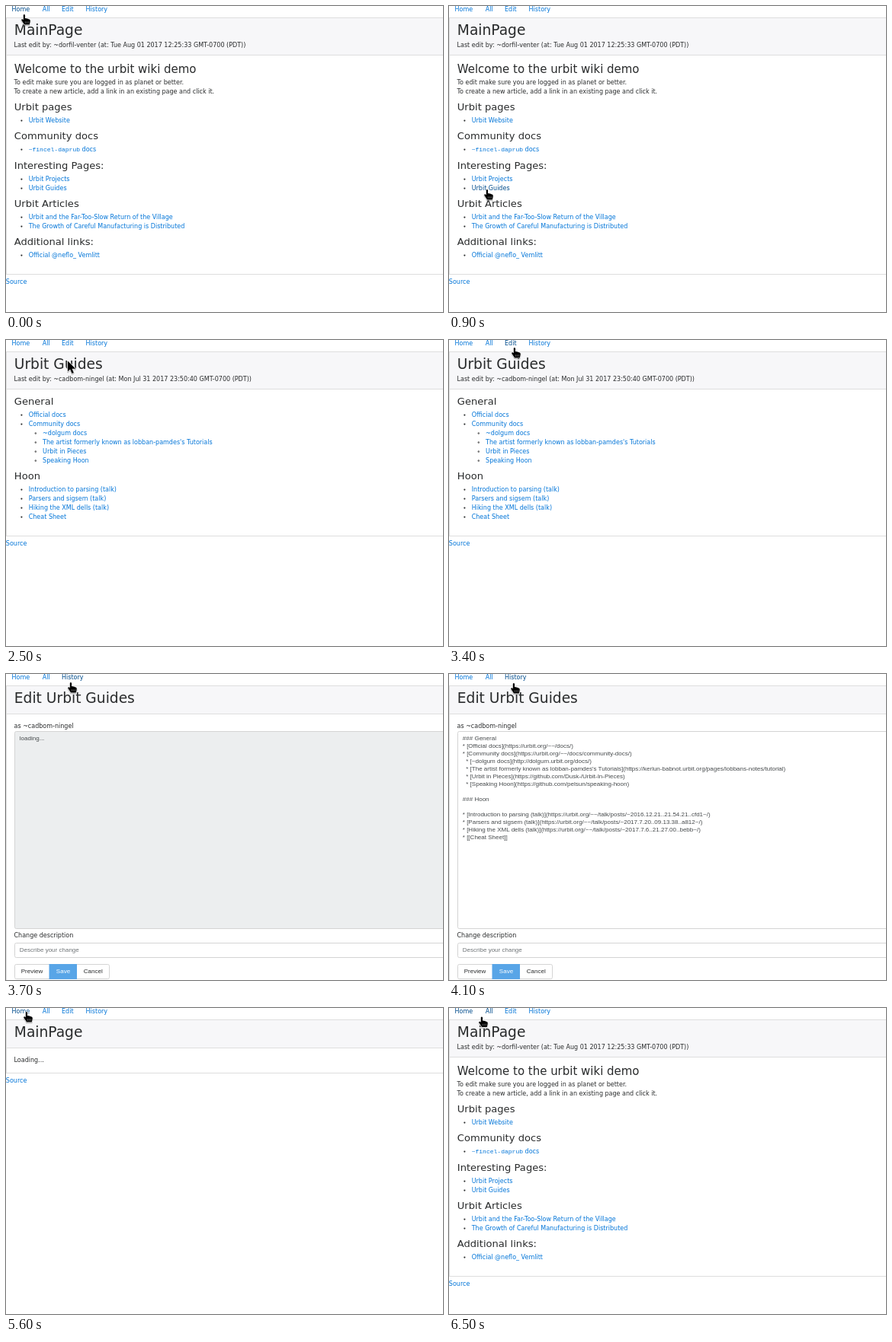
An HTML page that plays this animation: 573 by 402 pixels, repeating every 7300 ms.

```html
<!DOCTYPE html>
<html lang="en">
<head>
<meta charset="utf-8">
<title>Wiki demo</title>
<style>
  html, body { margin: 0; width: 100%; height: 100%; overflow: hidden; background: #fff; }
  svg { display: block; width: 573px; height: 402px; }
  text { font: 8.02px "DejaVu Sans", sans-serif; fill: #292b2c; white-space: pre; }
  .h1 { font-size: 18.65px; }
  .h2 { font-size: 14.97px; }
  .h3 { font-size: 13.08px; }
  .a { fill: #0275d8; }
  .a.on { fill: #014c8c; }
  .m { font-family: "Liberation Mono", monospace; }
  .f { font: 8.02px "Liberation Sans", sans-serif; fill: #464a4c; }
  .hint { fill: #6f7477; }
  .btn { fill: #292b2c; text-anchor: middle; }
  .save { fill: #fff; }
  .line { fill: #dedede; }
  .head { fill: #f7f7f9; }
  .box { fill: #fff; stroke: #d4d4d4; }
  .off { fill: #eceeef; }
  .fill { fill: #58a5e7; }
  .page { visibility: hidden; }
  .page.show { visibility: visible; }
  .cur { fill: #000; stroke: #fff; stroke-width: 1.4; paint-order: stroke; stroke-linejoin: round;
    filter: drop-shadow(.5px 1px .6px rgba(0,0,0,.3)); }
  .knuckle { fill: none; stroke: #fff; stroke-width: .5; opacity: .7; }
</style>
</head>
<body>
<svg id="stage" viewBox="0 0 573 402"></svg>
<script>
const LOOP = 7300, STEP = 100;
const stage = document.getElementById('stage');

const text = (x, y, s, cls = '') => `<text x="${x}" y="${y}" class="${cls}">${s}</text>`;
const rect = (x, y, w, h, cls, rx = 0) =>
  `<rect x="${x}" y="${y}" width="${w}" height="${h}" rx="${rx}" class="${cls}"/>`;
const link = (x, y, s) => text(x, y, s, 'a');
const item = (y, s) => `<circle cx="20.4" cy="${y - 2.4}" r="1.1" fill="#292b2c"/>` + link(29.7, y, s);
const subitem = (y, s) =>
  `<circle cx="38.8" cy="${y - 2.4}" r="1" fill="#888" stroke="#444" stroke-width=".5"/>` + link(48.1, y, s);
const h3 = (y, s) => text(10.8, y, s, 'h3');
const para = (y, s) => text(10.5, y, s);

// Navigation entries: label, x, hover zone
const HOME = ['Home', 7.5, 0, 40], ALL = ['All', 47.8, 40, 66];
const NAV = [HOME, ALL, ['Edit', 73, 66, 97], ['History', 104.6, 97, 140]];
const EDIT_NAV = [HOME, ALL, ['History', 73, 66, 110]];
const nav = list => list.map(([s, x, a, b]) =>
  `<text x="${x}" y="7.2" class="a" data-zone="${a},${b}">${s}</text>`).join('');

function card(title, headEnd, bottom, body, entries = NAV) {
  const end = bottom < 402 ? rect(0, bottom, 573, 1, 'line') + link(-.2, bottom + 13, 'Source') : '';
  return nav(entries) + rect(0, 15, 573, headEnd - 15, 'head') + rect(0, 15, 573, 1, 'line') +
    rect(0, headEnd, 573, 1, 'line') + rect(0, 15, 1, bottom - 15, 'line') + end +
    text(10.8, 37.5, title, 'h1') + body;
}
const wait = title => card(title, 52, 85, para(71, 'Loading...'));

const mainBody =
  para(53.8, 'Last edit by: ~dorfil-venter (at: Tue Aug 01 2017 12:25:33 GMT-0700 (PDT))') +
  text(10.8, 88, 'Welcome to the urbit wiki demo', 'h2') +
  para(103, 'To edit make sure you are logged in as planet or better.') +
  para(115, 'To create a new article, add a link in an existing page and click it.') +
  h3(137, 'Urbit pages') + item(153, 'Urbit Website') +
  h3(175.2, 'Community docs') + item(191, '<tspan class="m">~fincel-daprub</tspan> docs') +
  h3(214.2, 'Interesting Pages:') + item(230, 'Urbit Projects') + item(242, 'Urbit Guides') +
  h3(264.2, 'Urbit Articles') +
  item(280, 'Urbit and the Far-Too-Slow Return of the Village') +
  item(292, 'The Growth of Careful Manufacturing is Distributed') +
  h3(314.2, 'Additional links:') + item(330, 'Official @neflo_ Vemlitt');

const guideBody =
  para(53.8, 'Last edit by: ~cadbom-ningel (at: Mon Jul 31 2017 23:50:40 GMT-0700 (PDT))') +
  h3(85.2, 'General') + item(101, 'Official docs') + item(113, 'Community docs') +
  subitem(125, '~dolgum docs') +
  subitem(137, "The artist formerly known as lobban-pamdes's Tutorials") +
  subitem(149, 'Urbit in Pieces') + subitem(161, 'Speaking Hoon') +
  h3(183.2, 'Hoon') + item(199, 'Introduction to parsing (talk)') +
  item(211, 'Parsers and sigsem (talk)') + item(223, 'Hiking the XML dells (talk)') +
  item(235, 'Cheat Sheet');

const markdown = `### General
* [Official docs](https://urbit.org/~~/docs/)
* [Community docs](https://urbit.org/~~/docs/community-docs/)
  * [~dolgum docs](http://dolgum.urbit.org/docs/)
  * [The artist formerly known as lobban-pamdes's Tutorials](https://kerlun-babnot.urbit.org/pages/lobbans-notes/tutorial)
  * [Urbit in Pieces](https://github.com/Dusk-/Urbit-In-Pieces)
  * [Speaking Hoon](https://github.com/pelsun/speaking-hoon)

### Hoon

* [Introduction to parsing (talk)](https://urbit.org/~~/talk/posts/~2016.12.21..21.54.21..cfd1~/)
* [Parsers and sigsem (talk)](https://urbit.org/~~/talk/posts/~2017.7.20..09.13.38..a812~/)
* [Hiking the XML dells (talk)](https://urbit.org/~~/talk/posts/~2017.7.6..21.27.00..bebb~/)
* [[Cheat Sheet]]`;

function editor(content, cls) {
  const lines = content.split('\n').map((s, i) => text(17.8, 87.2 + i * 10, s, 'f')).join('');
  return card('Edit Urbit Guides', 52, 402,
    para(71, 'as ~cadbom-ningel') + rect(11.5, 75.5, 580, 259, 'box ' + cls, 2) + lines +
    para(346, 'Change description') + rect(11.5, 353.5, 580, 19, 'box', 2) +
    text(17.8, 365.2, 'Describe your change', 'f hint') +
    rect(11.5, 381.5, 124, 19, 'box', 2) + rect(56.5, 381, 36.5, 20, 'fill') +
    text(34, 393.3, 'Preview', 'f btn') + text(75, 393.3, 'Save', 'f btn save') +
    text(114.3, 393.3, 'Cancel', 'f btn'), EDIT_NAV);
}

const pages = {
  main: card('MainPage', 64, 352, mainBody),
  guideWait: wait('Urbit Guides'),
  guide: card('Urbit Guides', 64, 257, guideBody),
  editWait: editor('loading...', 'off'),
  edit: editor(markdown, ''),
  mainWait: wait('MainPage')
};
const schedule = [[0, 'main'], [1200, 'guideWait'], [1400, 'guide'], [3600, 'editWait'],
  [4100, 'edit'], [5500, 'mainWait'], [5800, 'main']];
const HOME_FOCUS = 5500;

// Pointer hot spot: time, x, y
const path = [[100, 24, 11], [500, 48, 229], [600, 48, 229], [900, 50, 241], [1300, 50, 241],
  [1700, 49, 227.5], [2100, 54, 152], [2600, 84, 13], [2800, 86, 24], [2900, 86, 24],
  [3400, 86, 10], [3500, 86, 10], [3600, 85, 11], [4000, 85, 11], [4100, 85, 12],
  [4400, 85, 12], [4800, 54, 12.7], [5100, 27, 9], [5400, 27, 9], [5500, 27, 5],
  [5700, 27, 5], [6000, 33, 1], [6500, 43, 11.5]];

stage.innerHTML = Object.entries(pages)
  .map(([id, body]) => `<g class="page" id="${id}">${body}</g>`).join('') +
  `<g id="pointer">
    <path id="arrow" class="cur" d="M0 0V14L3.2 11L5.6 16.5L8 15.4L5.7 10.2H10.3Z"/>
    <g id="hand">
      <path class="cur" d="M-1.2 .8Q-.1 -.7 1 .8V5.2Q2.2 4.6 3.2 5.6Q4.4 5 5.4 6.2Q7.4 5.9 7.8 8L7.4 11.2Q6.8 12.4 6.8 13.6H-.2Q-.6 12 -1.9 10.4L-3.7 7.8Q-4.2 6 -2.5 6.2L-1.2 7.2Z"/>
      <path class="knuckle" d="M1.4 9.2v2.6M3.4 9.2v2.6M5.4 9.2v2.6"/>
    </g>
  </g>`;

const $ = id => document.getElementById(id);
const links = [...stage.querySelectorAll('text.a')].map(el => {
  const page = el.parentNode.id, home = el.textContent === 'Home';
  if (el.dataset.zone) {
    const [x0, x1] = el.dataset.zone.split(',').map(Number);
    return { el, page, home, x0, x1, y0: -1, y1: 12.5 };
  }
  const b = el.getBBox(), y = +el.getAttribute('y');
  return { el, page, home, x0: b.x, x1: b.x + b.width, y0: y - 6.8, y1: y + 1.5 };
});

function pointAt(t) {
  const i = path.findIndex(k => k[0] > t);
  if (i === 0) return path[0].slice(1);
  if (i < 0) return path[path.length - 1].slice(1);
  const [t0, x0, y0] = path[i - 1], [t1, x1, y1] = path[i];
  const p = (t - t0) / (t1 - t0), e = p * p * (3 - 2 * p);
  return [x0 + (x1 - x0) * e, y0 + (y1 - y0) * e];
}

function draw(now) {
  const t = Math.floor(now % LOOP / STEP) * STEP;
  const page = schedule.filter(s => s[0] <= t).pop()[1];
  const [x, y] = pointAt(t);
  let over = false;
  for (const id in pages) $(id).classList.toggle('show', id === page);
  for (const l of links) {
    const hit = l.page === page && x >= l.x0 && x < l.x1 && y >= l.y0 && y < l.y1;
    over = over || hit;
    l.el.classList.toggle('on', hit || (l.home && t >= HOME_FOCUS));
  }
  $('pointer').setAttribute('transform', `translate(${x.toFixed(1)} ${y.toFixed(1)})`);
  $('hand').style.display = over ? '' : 'none';
  $('arrow').style.display = over ? 'none' : '';
}

const start = performance.now();
function tick() {
  draw(performance.now() - start);
  requestAnimationFrame(tick);
}
tick();
</script>
</body>
</html>
```
